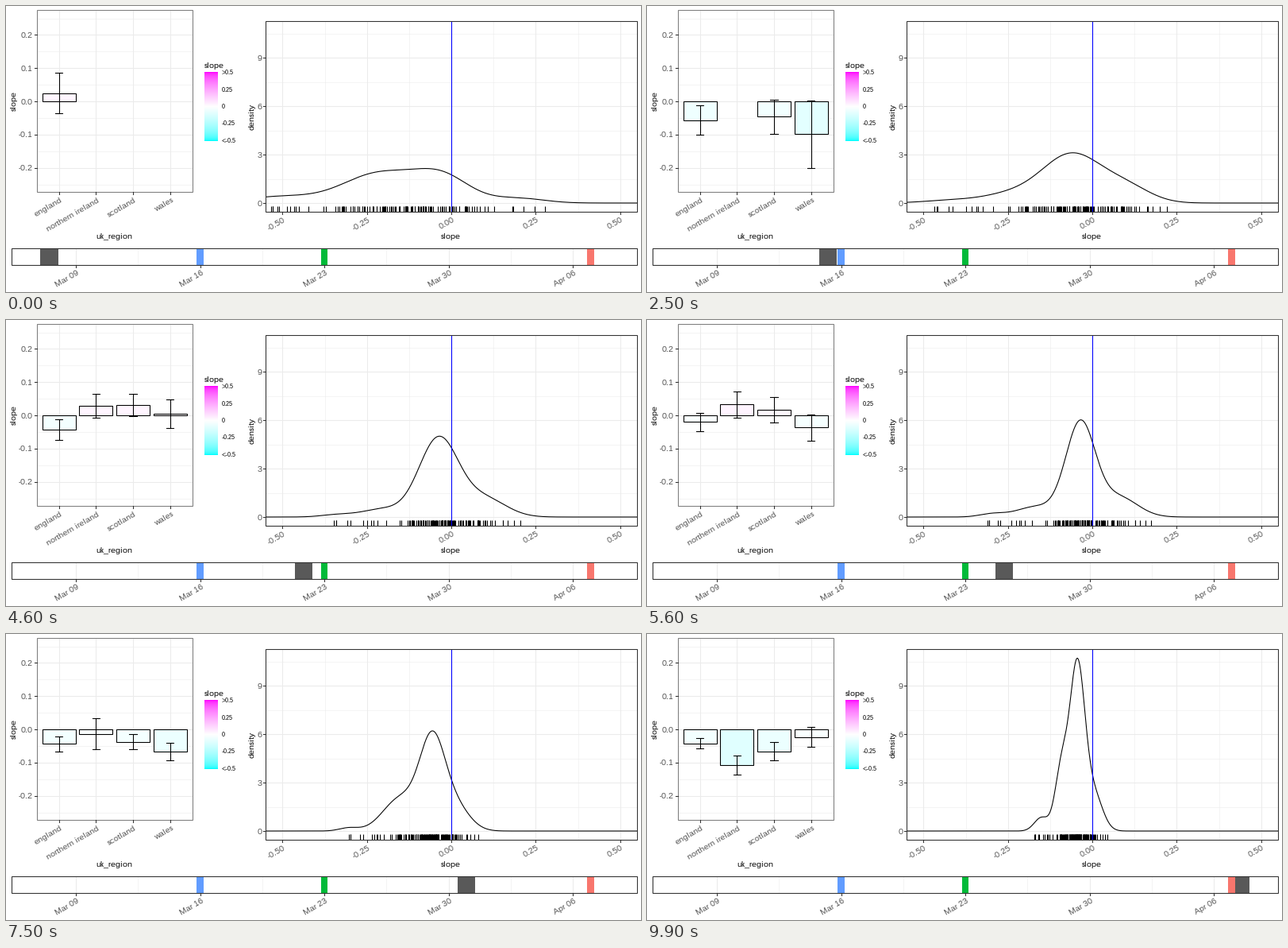
Animation, 800 px wide and 360 px high, one loop 10000 ms. Source, as a matplotlib script:

```python
import matplotlib.pyplot as plt
import numpy as np
from matplotlib.animation import FuncAnimation
from matplotlib.patches import Rectangle

W, H, N = 800, 360, 100
PT = 0.72                      # points per pixel at 100 dpi
LW = 1.07 * PT
DAY, MAR7, BASE = 22.37, 43.3, 248
DAY_FRAMES = np.round(np.arange(32) * (N - 1) / 31)
CATS = ["england", "northern ireland", "scotland", "wales"]
CAT_X = [66.8 + 46.6 * k for k in range(4)]
BORN = [0, 26, 6, 10]          # first frame of each bar
XS = np.linspace(327, 795, 937)

# Key moments; everything between them is linear.
KEYS = [0, 16, 35, 56, 75, 89, 99]
# Mean and error per region, ending at the last key.
BARS = [
    [(.025, .061), (-.048, .053), (-.067, .035), (-.02, .028),
     (-.044, .022), (-.047, .017), (-.042, .015)],
    [(.026, .032), (.033, .039), (-.014, .047), (-.078, .048), (-.108, .028)],
    [(-.129, .071), (.045, .028), (.017, .039), (-.038, .023),
     (-.048, .028), (-.066, .028)],
    [(-.234, .151), (.051, .046), (-.037, .039), (-.067, .027),
     (-.026, .026), (-.023, .029)],
]
# The density is a sum of four bells: centre, spread, height in pixels.
BELLS = np.array([
    [(345, 45, 8), (470, 46, 37), (549, 35, 32), (645, 32, 6)],
    [(375, 45, 5), (455, 40, 12), (527, 44, 46), (598, 30, 15)],
    [(400, 25, 2), (455, 25, 6), (544, 32, 79), (614, 30, 20)],
    [(435, 16, 4), (490, 24, 13), (546, 18.5, 118), (594, 24, 25)],
    [(432, 12, 4), (497, 22, 41), (537, 16, 110), (566, 18, 30)],
    [(478, 13, 11), (516, 13, 70), (539, 11, 156), (562, 13, 44)],
    [(497, 9, 17), (522, 8, 75), (542, 9.5, 207), (563, 11, 45)],
])
RANKS = np.random.default_rng(7).uniform(.004, .996, 125)

plt.rcParams.update({"font.family": "Liberation Sans",
                     "text.hinting": "default", "text.hinting_factor": 1})
fig = plt.figure(figsize=(W / 100, H / 100), dpi=100, facecolor="white")


def layer(x0, y0, x1, y1, z):
    """Axes over a box of the stage, measured in stage pixels."""
    ax = fig.add_axes([x0 / W, 1 - y1 / H, (x1 - x0) / W, (y1 - y0) / H],
                      zorder=z)
    ax.set(xlim=(x0, x1), ylim=(y1, y0), autoscale_on=False)
    ax.axis("off")
    return ax


stage = layer(0, 0, W, H, 5)


def panel(x0, y0, x1, y1, major_x, minor_x, major_y, minor_y, edge="#333333"):
    ax = layer(x0, y0, x1, y1, 1)
    for xs, ys, w in ((minor_x, minor_y, .5), (major_x, major_y, 1)):
        for x in xs:
            ax.axvline(x, color="#EBEBEB", lw=LW * w, zorder=0)
        for y in ys:
            ax.axhline(y, color="#EBEBEB", lw=LW * w, zorder=0)
    for x in major_x:
        stage.plot([x, x], [y1, y1 + 2.7], color="#333333", lw=LW)
    for y in major_y:
        stage.plot([x0 - 2.7, x0], [y, y], color="#333333", lw=LW)
    stage.add_patch(Rectangle((x0, y0), x1 - x0, y1 - y0, fill=False,
                              ec=edge, lw=LW))
    return ax


def text(x, y, s, size=10, color="black", ha="center", rot=0):
    stage.text(x, y, s, fontsize=size * PT, color=color, ha=ha, va="baseline",
               rotation=rot, rotation_mode="anchor")


def slanted(xs, y, labels):
    for x, s in zip(xs, labels):
        text(x + 4.5, y + 11.5, s, color="#4D4D4D", ha="right", rot=30)


def side(x, ys, labels):
    for y, s in zip(ys, labels):
        text(x, y + 3.6, s, color="#4D4D4D", ha="right")


def ramp(v):
    """Cyan - white - magenta over -0.5..0.5, blended in Lab."""
    t = min(abs(v) * 2, 1)
    end = (60.32, 98.25, -60.84) if v > 0 else (91.11, -48.09, -14.13)
    L, a, b = np.array([100, 0, 0]) * (1 - t) + np.array(end) * t
    f = (L + 16) / 116
    xyz = np.array([f + a / 500, f, f - b / 200]) ** 3 * [.9505, 1, 1.089]
    lin = np.array([[3.2406, -1.5372, -.4986],
                    [-.9689, 1.8758, .0415],
                    [.0557, -.2040, 1.0570]]) @ xyz
    return np.clip(1.055 * np.clip(lin, 0, 1) ** (1 / 2.4) - .055, 0, 1)


def tween(i, values):
    """Value at frame i of a list that ends at the last key."""
    values = np.asarray(values)
    frames = KEYS[-len(values):]
    pos = np.interp(i, frames, np.arange(len(values)))
    j = min(int(pos), len(values) - 2)
    return values[j] + (values[j + 1] - values[j]) * (pos - j)


def bell_sum(i):
    mid, spread, top = tween(i, BELLS).T[:, :, None]
    return (top * np.exp(-((XS - mid) / spread) ** 2 / 2)).sum(axis=0)


def val_y(v):
    return 120 - 418 * v


# bar panel
steps = np.array([.2, .1, 0, -.1, -.2])
left = panel(39, 5, 235, 234.4, CAT_X, [], val_y(steps),
             val_y(np.append(steps + .05, -.25)), "#7F7F7F")
side(33.8, val_y(steps), [f"{v:.1f}" for v in steps])
slanted(CAT_X, 234.5, CATS)
text(12.3, 120, "slope", rot=90)
text(136.7, 292.7, "uk_region")

# legend
text(250, 78, "slope", ha="left")
stage.imshow(np.array([[ramp(v)] for v in np.linspace(.5, -.5, 87)]),
             extent=(250, 267, 170, 83.5), aspect="auto")
for y, s in zip(np.linspace(83.5, 169.5, 5),
                (">0.5", "0.25", "0", "-0.25", "<-0.5")):
    text(272, y + 2.5, s, 8, ha="left")
stage.set(xlim=(0, W), ylim=(H, 0))

# density panel
slopes = np.linspace(-.5, .5, 5)
slope_x = 561 + 425.4 * slopes
dens_y = BASE - 61 * np.arange(4)
right = panel(327, 19, 795, 259.2, slope_x, slope_x[:4] + 53.2,
              dens_y, dens_y - 30.5)
side(322.3, dens_y, "0369")
slanted(slope_x, 259.2, [f"{v:.2f}" for v in slopes])
text(312.3, 139, "density", rot=90)
text(560.5, 292.7, "slope")

# date strip
weeks = 88 + 7 * DAY * np.arange(5)
strip = panel(7.2, 305, 795, 326.2, weeks, weeks[:4] + 3.5 * DAY, [], [])
slanted(weeks, 326.2, ["Mar 09", "Mar 16", "Mar 23", "Mar 30", "Apr 06"])
for x, c in ((weeks[1], "#619CFF"), (weeks[2], "#00BA38"),
             (weeks[4] + DAY, "#F8766D")):
    strip.add_patch(Rectangle((x - 4.3, 306), 8.6, 20.2, fc=c, lw=0, zorder=3))

# moving parts
boxes = [left.add_patch(Rectangle((x - 21, 120), 42, 0, ec="black", lw=LW,
                                  zorder=2)) for x in CAT_X]
whiskers = [left.plot([], [], color="black", lw=LW, zorder=3)[0] for _ in CATS]
density, = right.plot([], [], color="black", lw=LW, zorder=2)
marks = right.vlines(RANKS, 251.6, 259.2, color="black", lw=LW, zorder=2)
right.axvline(561, color="blue", lw=LW, zorder=3)
right.set(xlim=(327, 795), ylim=(259.2, 19))
today = strip.add_patch(Rectangle((MAR7, 306), DAY, 20.2, fc="#595959", lw=0,
                                  zorder=2))


def update(i):
    for k, x in enumerate(CAT_X):
        mean, err = tween(i, BARS[k])
        lo, hi = val_y(mean - err), val_y(mean + err)
        boxes[k].set_height(val_y(mean) - 120)
        boxes[k].set_facecolor(ramp(mean))
        whiskers[k].set_data([x - 4.6, x + 4.6, x, x, x - 4.6, x + 4.6],
                             [hi, hi, hi, lo, lo, lo])
        for part in (boxes[k], whiskers[k]):
            part.set_visible(i >= BORN[k])
    line = bell_sum(i)
    density.set_data(XS, BASE - line)
    share = np.cumsum(line)
    marks.set_segments([[(x, 251.6), (x, 259.2)]
                        for x in np.interp(RANKS * share[-1], share, XS)])
    today.set_x(MAR7 + DAY * np.interp(i, DAY_FRAMES, np.arange(32)))
    return [*boxes, *whiskers, density, marks, today]


anim = FuncAnimation(fig, update, frames=N, interval=100, repeat=True,
                     repeat_delay=0, blit=False)
plt.show()
```
